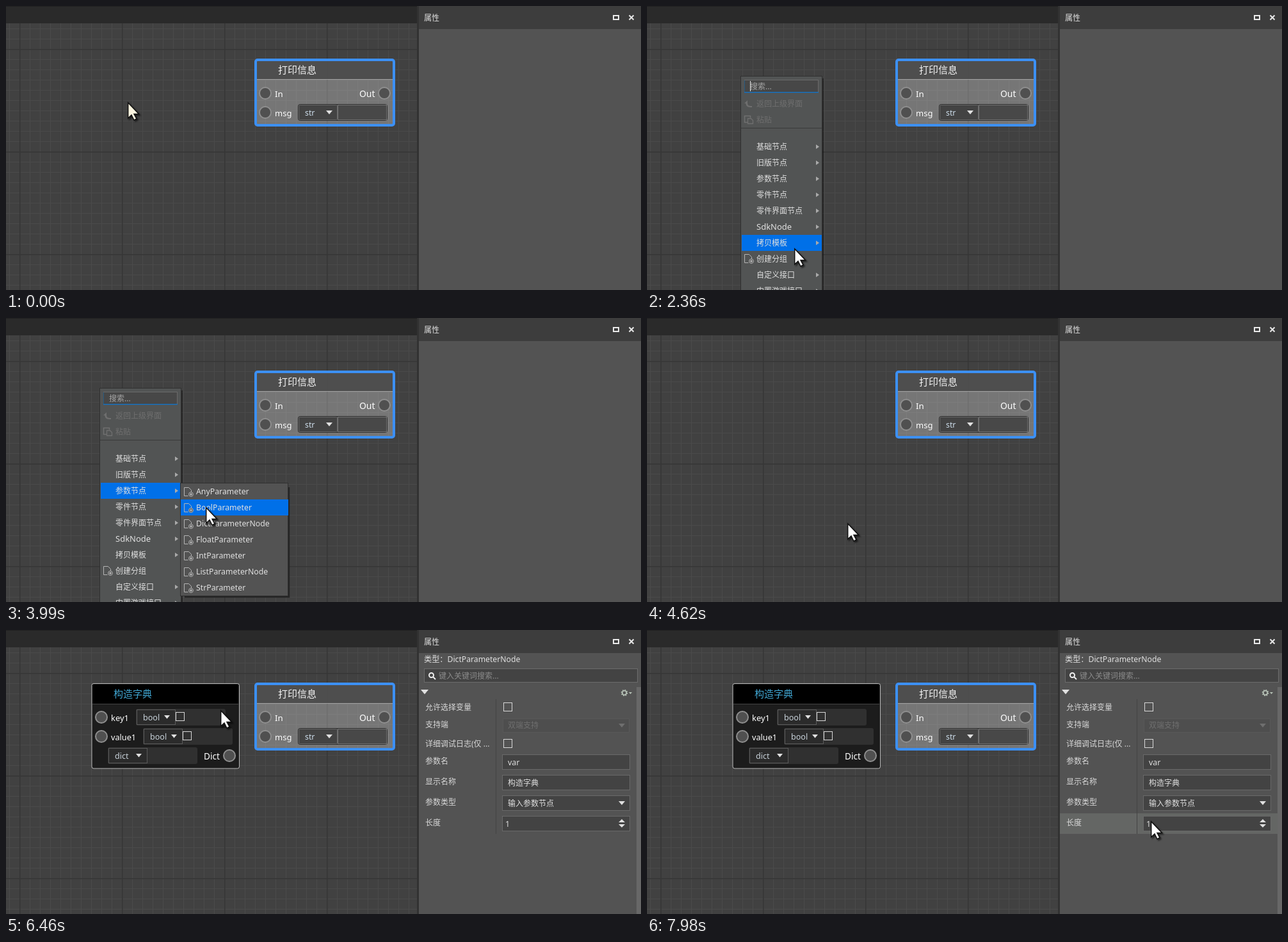
An HTML page that plays this animation: 992x443 px, repeating every 8000 ms.

```html
<!DOCTYPE html>
<html lang="zh-CN">
<head>
<meta charset="utf-8">
<title>Node editor</title>
<style>
html, body { margin: 0; width: 100%; height: 100%; overflow: hidden; background: #414141; }
svg { display: block; width: 992px; height: 443px; }
text { font-family: "Noto Sans", "Noto Sans CJK SC", sans-serif; white-space: pre; }
#cursor { filter: drop-shadow(2px 2px 1px #0009); }
</style>
</head>
<body>
<svg id="stage" viewBox="0 0 992 443"></svg>
<script>
const LOOP = 8000, STEP = 70;
const BLUE = '#0070e8', PALE = '#e0e0e0', DIM = '#6f6f6f';

const rect = (x, y, w, h, fill, more = '') =>
  `<rect x="${x}" y="${y}" width="${w}" height="${h}" fill="${fill}" ${more}/>`;
const frame = (x, y, w, h, fill, line, r = 0) =>
  rect(x + .5, y + .5, w - 1, h - 1, fill, `stroke="${line}" rx="${r}"`);
const text = (x, y, s, size = 12, fill = PALE) =>
  `<text x="${x}" y="${y}" font-size="${size}" fill="${fill}">${s}</text>`;
const path = (d, fill, line = 'none', w = 1) =>
  `<path d="${d}" fill="${fill}" stroke="${line}" stroke-width="${w}"/>`;
const down = (x, y, w = 9, fill = PALE) => path(`M${x} ${y}h${w}l${-w / 2} ${w * .6}z`, fill);
const port = (x, y) =>
  `<circle cx="${x}" cy="${y}" r="9" fill="#505050" stroke="#8f8f8f" stroke-width="2"/>`;
const check = (x, y) => frame(x, y, 14, 14, 'none', '#d8d8d8');
const group = (id, body) => `<g id="${id}">${body}</g>`;
const newIcon = (x, y) =>
  path(`M${x + 6.5} ${y + 13.5}h-6v-13h7l4 4v3`, 'none', '#b4b4b4') +
  `<circle cx="${x + 11}" cy="${y + 11}" r="3.4" fill="#535353" stroke="#b4b4b4"/>` +
  path(`M${x + 9} ${y + 11}h4m-2-2v4`, 'none', '#d0d0d0');

function canvasArea() {
  const fine = `<pattern id="fine" x="5" y="3" width="16" height="16" patternUnits="userSpaceOnUse">
    ${rect(0, 0, 16, 1, '#4a4a4a')}${rect(0, 0, 1, 16, '#4a4a4a')}</pattern>`;
  const coarse = `<pattern id="coarse" x="21" y="67" width="160" height="160" patternUnits="userSpaceOnUse">
    ${rect(0, 0, 160, 1.6, '#363636')}${rect(0, 0, 1.6, 160, '#363636')}</pattern>`;
  return `<defs>${fine}${coarse}</defs>` + rect(0, 0, 992, 443, '#414141') +
    rect(0, 0, 642, 443, 'url(#fine)') + rect(0, 0, 642, 443, 'url(#coarse)') +
    rect(0, 0, 642, 27, '#2a2a2a') + rect(0, 0, 642, 1, '#202020');
}

function printNode() {
  return rect(390, 84, 216, 102, '#fff', 'fill-opacity=".28"') +
    rect(390, 84, 216, 30, '#4a4a4a', 'fill-opacity=".9"') +
    rect(392, 114, 212, 1, '#a0a0a0') +
    rect(390, 84, 216, 102, 'none', 'stroke="#3c90f5" stroke-width="4" rx="3"') +
    text(425, 105, '打印信息', 15, '#f2f2f2') +
    port(405, 136) + port(405, 166) + port(591, 136) +
    text(420, 142, 'In', 13.3, '#fff') + text(552, 142, 'Out', 13.9, '#fff') +
    text(420, 172, 'msg', 13, '#fff') +
    frame(456, 153, 140, 26, '#444', '#2b2b2b', 3) +
    frame(457, 154, 61, 24, '#434343', '#6a6a6a', 2) +
    frame(518, 154, 77, 24, '#484848', '#747474') +
    text(467, 171, 'str', 12.3, '#cfe0ee') + down(500, 163, 10);
}

function dictNode() {
  const combo = (x, y, s, hasCheck) =>
    rect(x, y, 140, 26, '#303030', 'rx="3"') +
    frame(x + 1, y + 1, 61, 24, '#2b2b2b', '#5a5a5a') +
    text(x + 11, y + 18, s, 12.6, '#c8d2da') + down(x + 44, y + 10) +
    (hasCheck ? check(x + 62, y + 5) : '');
  return group('dict',
    rect(150, 84, 230, 132, '#1c1c1c', 'rx="3"') +
    rect(151, 85, 228, 30, '#000') + rect(151, 115, 228, 1, '#444') +
    rect(150, 83.5, 230.5, 132.5, 'none', 'stroke="#b8b8b8" rx="3"') +
    text(184, 105, '构造字典', 15, '#40a6d2') +
    port(165, 136) + port(165, 166) + port(365, 196) +
    text(180, 142, 'key1', 12.9, '#fff') + text(180, 172, 'value1', 12.7, '#fff') +
    text(325, 202, 'Dict', 13.6, '#fff') +
    combo(219, 123, 'bool', true) + combo(230, 153, 'bool', true) + combo(175, 183, 'dict'));
}

function panel() {
  const labels = [['允许选择变量', 125], ['支持端', 152], ['详细调试日志(仅 ...', 182],
    ['参数名', 209], ['显示名称', 241], ['参数类型', 273], ['长度', 305]];
  const field = y => frame(775, y, 200, 24, '#434343', '#696969');
  const props = text(653, 50, '类型：DictParameterNode', 12.2) +
    frame(653, 60, 334, 22, '#434343', '#6c6c6c') +
    '<circle cx="664.5" cy="70.5" r="3.5" fill="none" stroke="#eee" stroke-width="2"/>' +
    path('M667 73l4 4', 'none', '#eee', 2) + text(676, 76, '键入关键词搜索...', 12, '#8c8c8c') +
    down(648, 93, 12) + down(973, 97, 5, '#b8c4b8') +
    '<circle cx="966" cy="98" r="3.2" fill="none" stroke="#b8c4b8" stroke-width="1.6"/>' +
    '<circle cx="966" cy="98" r="4.6" fill="none" stroke="#b8c4b8" stroke-width="1.4" stroke-dasharray="1.8"/>' +
    rect(985, 89, 7, 354, '#676767') +
    group('hover', rect(645, 286, 340, 32, '#646664')) +
    rect(765, 108, 1, 210, '#444') +
    labels.map(([s, y]) => text(655, y, s, 12, '#d8d8d8')).join('') +
    check(777, 113) + check(777, 170) +
    frame(776, 138, 198, 22, '#4e4e4e', '#585858') + text(784, 153, '双端支持', 12, DIM) +
    down(957, 146, 10, DIM) +
    field(194) + text(784, 211, 'var', 12.3) + field(226) + text(784, 243, '构造字典') +
    field(258) + text(784, 275, '输入参数节点') + down(957, 267, 10) +
    field(290) + text(780, 307, '1', 12.3) +
    path('M957 300l5-5l5 5zM957 303l5 5l5-5z', PALE);
  return rect(642, 0, 3, 443, '#323232') + rect(645, 0, 347, 36, '#3d3d3d') +
    rect(645, 36, 347, 407, '#535353') + text(653, 23, '属性') +
    rect(949, 15, 8, 6, 'none', 'stroke="#e8e8e8" stroke-width="2"') +
    path('M973.5 14.5l7 7m0-7l-7 7', 'none', '#e8e8e8', 2) + group('props', props);
}

function menu() {
  const items = ['基础节点', '旧版节点', '参数节点', '零件节点', '零件界面节点', 'SdkNode',
    '拷贝模板', '创建分组', '自定义接口', '内置游戏接口'];
  const rows = items.map((s, i) => {
    const y = 219 + i * 25;
    return text(171, y + 5, s, s === 'SdkNode' ? 13 : 12) +
      (i === 7 ? newIcon(152, y - 7) : path(`M264 ${y - 3}l5 3.5l-5 3.5z`, '#aaa'));
  }).join('');
  return group('menu',
    rect(273, 113, 3, 330, '#000', 'opacity=".4"') +
    frame(146, 109, 128, 340, '#525454', '#303030') +
    frame(152, 115, 116, 20, '#474747', '#6a6a6a') + rect(152, 134, 116, 1.3, '#0f74cc') +
    rect(152, 116, 1, 18, '#27597f') +
    text(161, 130, '搜索...', 12, '#a6a6a6') + group('caret', rect(161, 117, 1, 16, '#eee')) +
    path('M152 152l5-5v3.5c0 5 2 5.500 7 5.500v2c-6 0-9.500-1-9.500-6z', DIM) +
    path('M157 181.500h-4.500v-10h9v3', 'none', DIM, 1.6) +
    path('M157.500 175.500h5l3 3v5h-8z', 'none', DIM, 1.3) +
    text(171, 157, '返回上级界面', 12, DIM) + text(171, 182, '粘贴', 12, DIM) +
    rect(147, 190, 126, 1, '#3a3a3a') + rect(148, 207, 125, 25, BLUE, 'id="pick"') + rows);
}

function submenu() {
  const items = ['AnyParameter', 'BoolParameter', 'DictParameterNode', 'FloatParameter',
    'IntParameter', 'ListParameterNode', 'StrParameter'];
  return group('shade', path('M442 264V435H279', 'none', '#252525', 2.4)) +
    group('sub', frame(272, 257, 169, 177, '#535353', '#303030') +
      rect(273, 258, 168, 25, BLUE, 'id="subPick"') +
      items.map((s, i) => newIcon(278, 264 + i * 25) + text(297, 275 + i * 25, s, 12.3)).join(''));
}

function pointer() {
  return group('ring', '<circle r="12" fill="#ff0" fill-opacity=".47"/>') +
    group('cursor',
      '<path id="arrow" d="M.7.8V25L6 20l4 8l4-2l-4-7.500h7.500z" stroke="#111" stroke-width="1.5"/>' +
      group('beam', ['#000', '#fff'].map((c, i) =>
        path('M-6-10h4l2 2l2-2h4M0-8V11M-6 13h4l2-2l2 2h4', 'none', c, i ? 1.6 : 4.5)).join('')));
}

const $ = id => document.getElementById(id);
$('stage').innerHTML = canvasArea() + printNode() + dictNode() + panel() + menu() + submenu() + pointer();

// Pointer path: time, x, y
const keys = [
  [0, 190, 150], [130, 190, 150], [410, 142, 108], [600, 142, 108], [670, 146, 109],
  [1590, 146, 109], [1660, 169, 122], [2360, 230, 378], [2490, 230, 378], [2980, 229, 270],
  [3310, 229, 270], [3590, 314, 274], [3850, 314, 274], [3990, 312, 295], [4270, 313, 320],
  [4680, 313, 320], [5170, 279, 231], [5300, 279, 231], [5790, 297, 102], [5920, 297, 102],
  [6060, 279, 101], [6390, 279, 101], [6460, 335, 125], [6940, 809, 300], [7070, 809, 300],
  [7910, 781, 296], [7980, 787, 298]
];

function pointerAt(t) {
  const i = keys.findLastIndex(k => k[0] <= t);
  const [t0, x0, y0] = keys[i], [t1, x1, y1] = keys[i + 1] || [LOOP, x0, y0];
  const p = Math.floor((t - t0) / STEP) * STEP / (t1 - t0);
  return [x0 + (x1 - x0) * p, y0 + (y1 - y0) * p].map(Math.round);
}

const show = (id, on) => $(id).setAttribute('display', on ? 'inline' : 'none');
const move = (id, x, y) => $(id).setAttribute('transform', `translate(${x} ${y})`);

function draw(t) {
  const within = (a, b) => t >= a && t < b;
  const [x, y] = pointerAt(t);
  const inSub = x > 273, row = inSub ? 2 : Math.floor((y - 207) / 25);
  const typing = within(1660, 1730);

  show('menu', within(1180, 4550));
  show('caret', Math.floor((t - 1180) / 482) % 2 === 0);
  show('pick', row >= 0);
  move('pick', 0, row * 25);
  show('shade', within(3040, 4550));
  show('sub', within(3110, 4550));
  show('subPick', inSub);
  move('subPick', 0, Math.floor((y - 258) / 25) * 25);

  show('dict', t >= 4750);
  move('dict', t < 5990 ? 0 : t < 6060 ? -8 : -16, 0);
  show('props', t >= 4820);
  show('hover', t >= 7140);

  show('ring', within(1000, 1180) || within(4410, 4550) || within(5990, 6260));
  move('ring', x, y);
  move('cursor', x, y);
  show('arrow', !typing);
  show('beam', typing);
  $('arrow').setAttribute('fill', t < 1000 ? '#fbf4df' : '#fff');
}

const start = performance.now();
function tick() {
  draw((performance.now() - start) % LOOP);
  requestAnimationFrame(tick);
}
tick();
</script>
</body>
</html>
```
